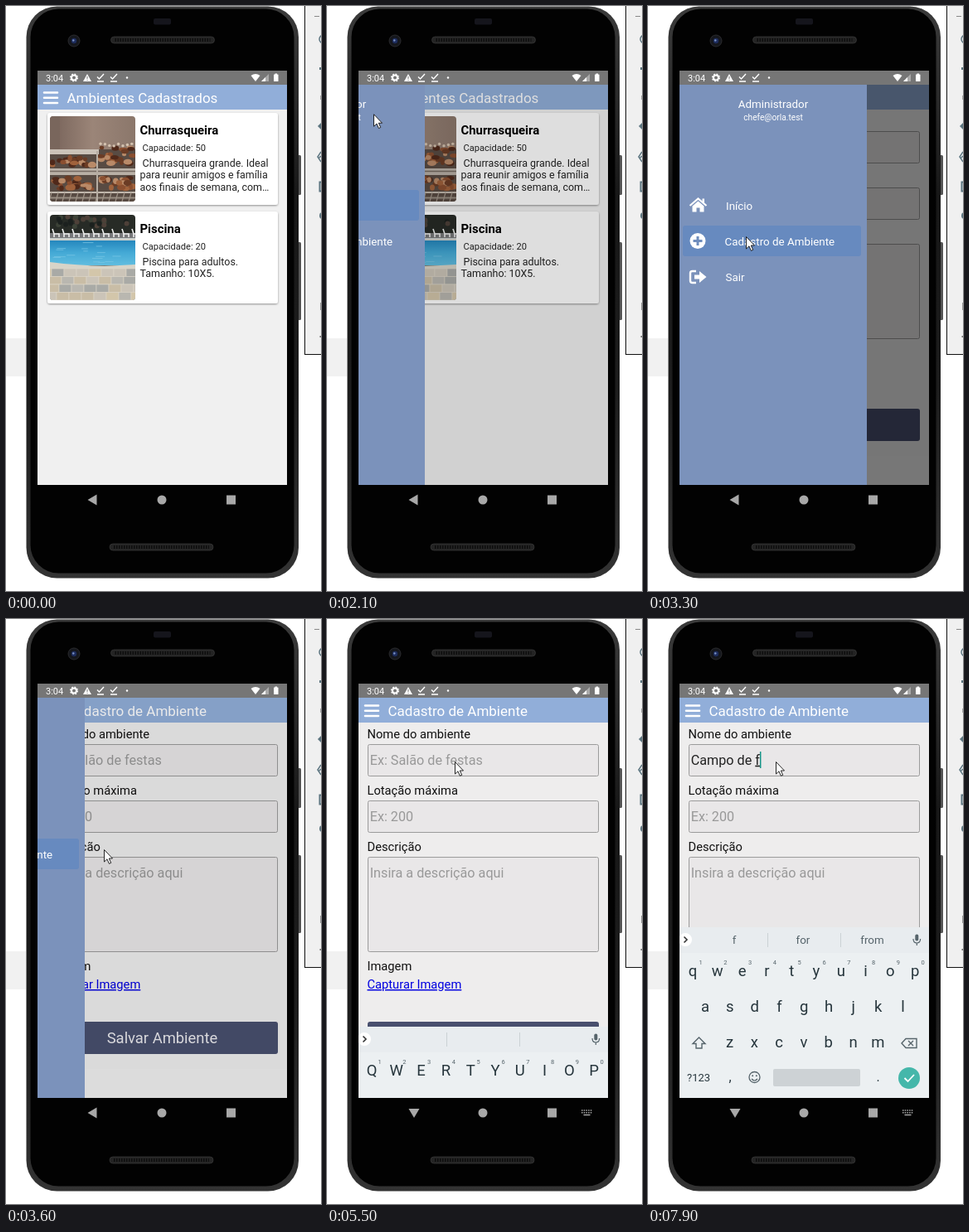
An HTML page that plays this animation: 380 by 706 pixels, repeating every 8 s.

```html
<!DOCTYPE html>
<html lang="pt">
<head>
<meta charset="utf-8">
<style>
html, body { margin: 0; width: 100%; height: 100%; overflow: hidden; background: #fff; }
svg { display: block; width: 380px; height: 706px; font-family: Roboto, sans-serif; }
text { white-space: pre; }
</style>
</head>
<body>
<svg id="stage" viewBox="0 0 380 706"></svg>
<script>
const text = (x, y, size, str, fill = '#111', more = '') =>
  `<text x="${x}" y="${y}" font-size="${size}" fill="${fill}" ${more}>${str}</text>`;
const mid = (x, y, size, str, fill, more = '') =>
  text(x, y, size, str, fill, `text-anchor="middle" ${more}`);
const rect = (x, y, w, h, fill, r = 0, more = '') =>
  `<rect x="${x}" y="${y}" width="${w}" height="${h}" fill="${fill}" rx="${r}" ${more}/>`;
const circle = (x, y, r, fill, more = '') =>
  `<circle cx="${x}" cy="${y}" r="${r}" fill="${fill}" ${more}/>`;
const shape = (d, fill, more = '') => `<path d="${d}" fill="${fill}" ${more}/>`;
const line = (d, stroke, width = 1, more = '') =>
  shape(d, 'none', `stroke="${stroke}" stroke-width="${width}" ${more}`);
const group = (id, body, more = '') => `<g id="${id}" ${more}>${body}</g>`;
const many = (n, fn) => Array.from({ length: n }, (_, i) => fn(i)).join('');

let seed = 7;
const rand = () => (seed = seed * 16807 % 2147483647) / 2147483647;
const pick = list => list[Math.floor(rand() * list.length)];

// Scenery around the phone
function desktop() {
  const ink = '#5c7580';
  return rect(0, 401, 24, 46, '#f1f1f1') +
    rect(360.5, -1, 30, 421.5, '#f0f0f0', 0, 'stroke="#111"') +
    line('M372 12.5H378', '#888') +
    circle(383, 40, 5, 'none', `stroke="${ink}" stroke-width="1.5"`) +
    rect(378, 74, 2, 3, ink) + rect(379, 108, 1, 5, '#aaa') +
    shape('M376 145L380 141V149Z', ink) +
    line('M380 176L376 182L380 188M377 184L380 181', ink, 1.5) +
    line('M380 212.5H378.5V223.5H380', ink, 2) +
    circle(382, 253, 4, ink) + rect(379, 358, 1, 9, '#999') + rect(378.5, 398, 1.5, 2, '#777');
}

function speaker(x, y) {
  return rect(x, y, 125, 8, '#242424', 4, 'stroke="#3a3a3a" stroke-width=".7"') +
    line(`M${x + 5} ${y + 4}H${x + 120}`, '#0d0d0d', 4, 'stroke-dasharray="1.5 1.5"');
}

function phone() {
  return rect(350, 180, 6, 48, '#555', 1.5) + rect(350, 285, 6, 94, '#555', 1.5) +
    rect(24.5, .5, 328.5, 690, 'url(#rim)', 37) +
    rect(29.5, 3.5, 318, 681, '#020202', 34) +
    rect(178, 15, 21, 7.5, '#15151c', 2) + speaker(126.5, 37) + speaker(125, 649) +
    circle(82, 42, 7, '#15171c', 'stroke="#2b2b2e"') + circle(82, 42, 3.2, '#1d2c5c') +
    circle(81.3, 41.5, 1.2, '#7b92c4');
}

function statusBar() {
  const tick = x => line(`M${x - 4} 85.5L${x - 1.5} 88L${x + 4} 82M${x - 4} 91H${x + 4}`, '#fff', 1.4);
  return rect(38, 78, 301, 17, '#767676') + text(48, 90.5, 11, '3:04', '#fff') +
    circle(82, 86.5, 3, 'none', 'stroke="#fff" stroke-width="2"') +
    circle(82, 86.5, 4.4, 'none', 'stroke="#fff" stroke-width="1.4" stroke-dasharray="1.8 1.65"') +
    shape('M98 82L103 91H93Z', '#fff') + line('M98 85V88M98 89V90', '#767676') +
    tick(114) + tick(130) + circle(146, 86.5, 1.2, '#fff') +
    shape('M295.5 84Q301 80 306.5 84L301 91Z', '#fff') +
    shape('M317 82V91H308Z', '#aaa') + shape('M313 86V91H308Z', '#fff') +
    rect(323, 82.5, 5.5, 8.5, '#fff', .6) + rect(324.5, 81.5, 2.5, 2, '#fff');
}

function grillPhoto() {
  const meats = ['#6b3c25', '#8b4f30', '#50291a', '#a0623c', '#b98a68'];
  const blobs = (n, x, y, w, h) => many(n, () =>
    `<ellipse cx="${x + rand() * w}" cy="${y + rand() * h}" rx="${2.5 + rand() * 3}" ry="${2 + rand() * 2}" fill="${pick(meats)}"/>`);
  const ends = (n, x, y, step) => many(n, i => circle(x + i * step, y + rand() * 3, 1.7, '#d5c3b0'));
  return rect(53, 133, 103, 103, 'url(#wall)') +
    rect(53, 133, 12, 42, '#79665c') + rect(53, 173, 103, 63, '#584b43') +
    rect(53, 173, 59, 6, '#cbc2b8') +
    blobs(22, 56, 182, 52, 11) + blobs(24, 114, 168, 40, 22) + ends(8, 114, 166, 5.4) +
    rect(53, 196, 103, 8, '#b9b0a6') + line('M53 199.5H156', '#756a62', 1.5) +
    blobs(26, 55, 208, 50, 13) + blobs(24, 114, 207, 40, 14) +
    line('M53 225H156', '#c0b7ac', 2) + line('M53 231.5H156', '#988d82', 2) +
    many(13, i => line(`M${55 + i * 8} 225L${52 + i * 8} 236`, '#a09488', 1.2)) +
    line('M110 175V236', '#b5aca2', 2);
}

function poolPhoto() {
  const stones = ['#c9bda6', '#b9b7b0', '#d3c6aa', '#a9aaa6', '#cbc4b8'];
  return rect(53, 252, 103, 103, '#272b26') +
    many(24, () => circle(53 + rand() * 103, 253 + rand() * 13, 3, pick(['#3c4237', '#4d4038', '#1b201e']))) +
    rect(53, 274, 103, 8, '#77787a') +
    many(9, i => line(`M${56 + i * 12} 269L${58 + i * 12} 275H${64 + i * 12}V279M${58 + i * 12} 275V279`, '#eee', 1.6)) +
    rect(53, 280, 103, 3, '#ccd0cc') + rect(53, 283, 103, 30, 'url(#water)') +
    many(16, () => line(`M${54 + rand() * 88} ${285 + rand() * 25}h${5 + rand() * 9}`, '#7bc7e5', .7)) +
    shape('M53 309Q105 316 156 312V355H53Z', '#d8d4c8') +
    many(4, r => many(9, c => rect(40 + c * 15 - r * 3, 317 + r * 9.5, 15, 9.5, pick(stones), 0, 'stroke="#ddd6c8" stroke-width=".6"')));
}

function card(y, title, seats, lines, photo) {
  return rect(50, y, 278, 111, '#fff', 3, 'filter="url(#shadow)"') +
    `<g clip-path="url(#photos)">${photo}</g>` +
    text(161.5, y + 25.5, 14.9, title, '#000', 'font-weight="700"') +
    text(164.5, y + 46, 11.1, 'Capacidade: ' + seats, '#222') +
    lines.map((s, i) => text(161.5, y + 64.5 + i * 14.7, 12.45, s, '#222')).join('');
}

function field(y, h, label, hint, id) {
  return text(48.5, y - 7, 14.7, label) +
    rect(49.5, y + .5, 278, h, '#e9e7e8', 2, 'stroke="#9b9b9b"') +
    text(51.7, y + 24.7, 16.2, hint, '#999', id ? `id="${id}"` : '');
}

function pages() {
  return rect(38, 95, 301, 483, '#f0f0f0') +
    group('list',
      card(129, 'Churrasqueira', 50, [' Churrasqueira grande. Ideal', 'para reunir amigos e família', 'aos finais de semana, com…'], grillPhoto()) +
      card(248, 'Piscina', 20, [' Piscina para adultos.', 'Tamanho: 10X5.'], poolPhoto())) +
    group('form',
      rect(38, 125, 301, 418, '#eeeded') +
      field(151, 38, 'Nome do ambiente', 'Ex: Salão de festas', 'hint') +
      field(219, 38, 'Lotação máxima', 'Ex: 200') +
      field(287, 114, 'Descrição', 'Insira a descrição aqui') +
      text(48.5, 424, 14.7, 'Imagem') +
      text(48.5, 446, 14.7, 'Capturar Imagem', '#0000e0', 'text-decoration="underline"') +
      rect(49, 486, 279, 39, '#484f6e', 3) + mid(188.5, 512, 18.4, 'Salvar Ambiente', '#ececf0') +
      text(51.7, 175.7, 16.2, '<tspan id="done"></tspan><tspan id="word" text-decoration="underline"></tspan>', '#222', 'id="typed"') +
      rect(0, 160, 1.5, 20, '#159588', 0, 'id="caret"')) +
    rect(38, 95, 301, 30, '#91aed9') +
    line('M46 104.5H62M46 110.7H62M46 117H62', '#fff', 2.6, 'stroke-linecap="round"') +
    text(73.5, 117, 17, '', '#fff', 'id="title"');
}

function drawer() {
  return rect(38, 95, 226, 483, '#7b92bb') +
    mid(151, 123, 13.4, 'Administrador', '#fff') + mid(151, 138, 10.2, 'chefe@orla.test', '#fff') +
    rect(42, 222, 215, 37, '#678abf', 3, 'id="mark"') +
    line('M50.5 241L60.5 232.5L70.5 241', '#fff', 2.2) + rect(65.5, 232.5, 2.5, 5, '#fff') +
    shape('M53.5 241.5L60.5 235.5L67.5 241.5V248.5H62.5V243.5H58.5V248.5H53.5Z', '#fff') +
    circle(60, 283.5, 9.5, '#fff') + line('M54.5 283.5H65.5M60 278V289', '#6f8dbd', 3) +
    line('M58 320H53.5Q51 320 51 322.5V331.5Q51 334 53.5 334H58', '#fff', 2.4) +
    shape('M56 324.5H62V320L70.5 327L62 334V329.5H56Z', '#fff') +
    text(94, 245.5, 13.4, 'Início', '#fff') + text(92.5, 288.5, 13.4, 'Cadastro de Ambiente', '#fff') +
    text(93.5, 332, 13.4, 'Sair', '#fff');
}

function keyboard() {
  const ink = '#26353c', soft = '#56646b';
  const row = (keys, x, y) => [...keys].map((k, i) => mid(x + i * 29.8, y, 18.5, k, ink, 'class="key"')).join('');
  return rect(38, 372, 301, 206, '#ecf0f2') + rect(38, 372, 301, 31, '#e8ecef') +
    circle(45, 387, 8, '#fff') + line('M43.5 383.5L47 387L43.5 390.5', '#333', 1.6) +
    line('M144.5 379V396M232.5 379V396', '#cbd1d4') +
    [104, 187, 270.5].map(x => mid(x, 392, 13.4, '', soft, 'class="tip"')).join('') +
    rect(322.3, 380.5, 4, 8, soft, 2) + line('M320 386Q320 391 324.3 391T328.6 386M324.3 391V394', soft, 1.2) +
    row('qwertyuiop', 54, 431) + row('asdfghjkl', 69, 474) + row('zxcvbnm', 98.5, 517) +
    many(10, i => mid(63.5 + i * 29.8, 417, 7.5, (i + 1) % 10, soft)) +
    line('M61.5 505L69 512.5H65V518H58V512.5H54Z', soft, 1.4) +
    line('M306 512L311 506.5H324V517.5H311ZM314 509L320 515M320 509L314 515', soft, 1.4) +
    text(47, 558, 13, '?123', ink) + mid(99, 558, 16, ',', ink) + mid(277.5, 558, 16, '.', ink) +
    circle(128.5, 553, 6.5, 'none', `stroke="${soft}" stroke-width="1.3"`) +
    circle(126.2, 551.3, 1, soft) + circle(130.8, 551.3, 1, soft) + line('M125 555Q128.5 559 132 555', soft, 1.2) +
    rect(151, 543, 105, 21, '#cdd2d5', 2) + circle(315, 554, 13, '#45b7aa') +
    line('M309.5 554L313.5 558L321 550', '#fff', 1.8);
}

function navBar() {
  return shape('M98.5 596L109.5 589.5V602.5Z', '#a8a8a8', 'id="back"') +
    shape('M98.5 591H111.5L105 602Z', '#a8a8a8', 'id="down"') +
    circle(188, 596, 5.5, '#a8a8a8') + rect(266, 590.5, 11, 11, '#a8a8a8') +
    group('keysIcon', line('M307 593H320M307 595.7H320', '#aaa', 1.4, 'stroke-dasharray="1.5 1.2"') +
      line('M309.5 598.5H317.5', '#aaa', 1.4));
}

const $ = id => document.getElementById(id);
const gradient = (id, stops, more) => `<linearGradient id="${id}" ${more}>` +
  stops.map((c, i) => `<stop offset="${i / (stops.length - 1)}" stop-color="${c}"/>`).join('') + '</linearGradient>';
$('stage').innerHTML = '<defs>' +
  gradient('rim', ['#3b3b3b', '#171717', '#1c1c1c', '#333'], 'x2="0" y2="1"') +
  gradient('wall', ['#766259', '#9b8578', '#8b776b'], '') +
  gradient('water', ['#2587bd', '#45aad6', '#61bddf'], 'x2="0" y2="1"') +
  '<clipPath id="screen"><rect x="38" y="78" width="301" height="500"/></clipPath>' +
  `<clipPath id="photos">${rect(53, 133, 103, 103, '#000', 4) + rect(53, 252, 103, 103, '#000', 4)}</clipPath>` +
  '<filter id="shadow"><feDropShadow dx="0" dy="1" stdDeviation="1.2" flood-opacity=".4"/></filter></defs>' +
  desktop() + phone() +
  group('view', pages() + rect(38, 95, 301, 483, '#000', 0, 'id="shade"') +
    group('drawer', drawer()) + group('keyboard', keyboard()) + statusBar(), 'clip-path="url(#screen)"') +
  navBar() +
  shape('M.5 .5V15L4 11.8L6.4 17.3L8.7 16.3L6.3 11H10.5Z', '#fff', 'id="cursor" stroke="#111" stroke-width=".9"');

// Keys are [time, value, value...]; values are interpolated between them
function at(t, keys) {
  const i = keys.findIndex(k => k[0] > t);
  if (i < 0) return keys[keys.length - 1].slice(1);
  if (!i) return keys[0].slice(1);
  const a = keys[i - 1], b = keys[i], p = (t - a[0]) / (b[0] - a[0]);
  return a.slice(1).map((v, j) => v + (b[j + 1] - v) * p);
}

const pointer = [[400, 374, 318], [1200, 133, 168], [1400, 47, 112], [2000, 47, 112], [2400, 83, 185],
  [2800, 118, 278], [3700, 118, 278], [4200, 160, 180], [4800, 160, 180], [4900, 154, 172]];
const drawerWidth = [[1900, 0], [2000, 10], [2100, 80], [2200, 165], [2300, 212], [2400, 226],
  [3300, 226], [3400, 188], [3500, 120], [3600, 57], [3700, 20], [3800, 5], [3900, 0]];
const typing = [[0, '', ''], [6000, 'C', 'C Can Come'], [6100, 'Ca', 'Ca Can Call'], [6300, 'Cam', 'Cam Can Came'],
  [6600, 'Camp', 'Camp Camps Campus'], [6800, 'Campo', 'Campo Camp Campos'], [7000, 'Campo ', 'de and is'],
  [7200, 'Campo d', 'd do did'], [7400, 'Campo de', 'de dear den'], [7500, 'Campo de f', 'f for from']];

const show = (id, on) => $(id).setAttribute('display', on ? 'inline' : 'none');
const move = (id, x, y) => $(id).setAttribute('transform', `translate(${x} ${y})`);
const keys = [...document.querySelectorAll('.key')], tips = [...document.querySelectorAll('.tip')];

function draw(t) {
  const onForm = t >= 3200;
  show('list', !onForm);
  show('form', onForm);
  $('title').textContent = onForm ? 'Cadastro de Ambiente' : 'Ambientes Cadastrados';

  const [open] = at(t, drawerWidth);
  move('drawer', open - 226, 0);
  $('shade').setAttribute('opacity', (open / 226) ** 1.3 * .5);
  move('mark', 0, t >= 3100 ? 43 : 0);

  const [, typed, words] = typing.filter(k => k[0] <= t).pop();
  const cut = typed.lastIndexOf(' ') + 1;
  $('done').textContent = typed.slice(0, cut);
  $('word').textContent = typed.slice(cut);
  show('hint', !typed);
  move('caret', 51.7 + (typed ? $('typed').getComputedTextLength() : 0), 0);
  show('caret', t >= 4600 && (t < 5300 || t >= 5600));

  const [drop] = at(t, [[5400, 206], [5500, 120], [5600, 35], [5700, 0]]);
  move('keyboard', 0, drop);
  keys.forEach(k => k.textContent = typed ? k.textContent.toLowerCase() : k.textContent.toUpperCase());
  tips.forEach((tip, i) => tip.textContent = words.split(' ')[i] || '');

  show('back', t < 4900);
  show('down', t >= 4900);
  show('keysIcon', t >= 4900);
  show('cursor', t >= 400);
  move('cursor', ...at(t, pointer));
}

const start = performance.now();
function tick() {
  const t = (performance.now() - start) % 8000;
  draw(Math.floor(t / 100) * 100); // the picture steps ten times a second
  requestAnimationFrame(tick);
}
tick();
</script>
</body>
</html>
```
